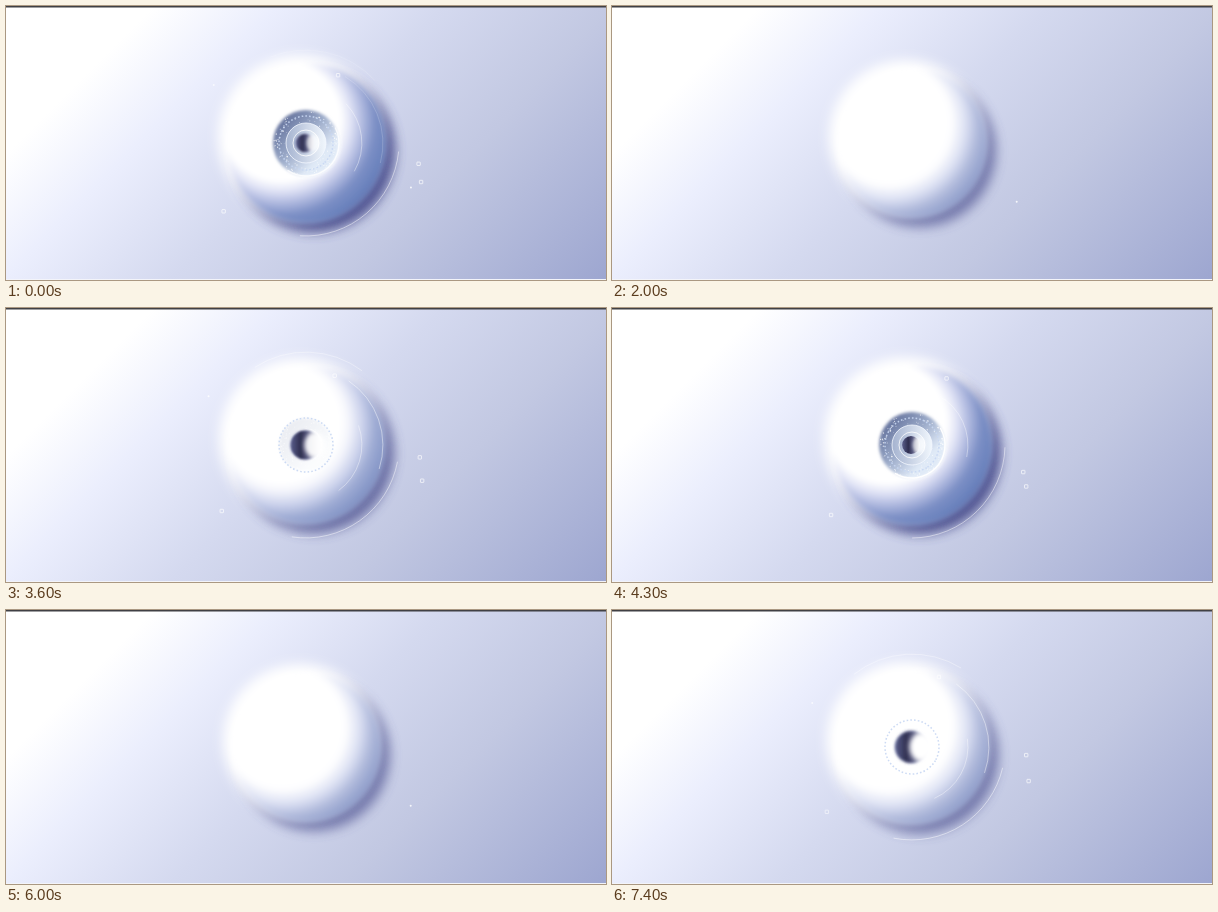
An HTML page that plays this animation: 600 px wide and 274 px high, repeating every 7.5 s.

```html
<!DOCTYPE html>
<html lang="en">
<head>
<meta charset="utf-8">
<title>Pulsing orb</title>
<style>
html, body { margin: 0; width: 100%; height: 100%; overflow: hidden; background: #fff; }
svg { display: block; width: 100vw; height: 100vh; }
</style>
</head>
<body>
<svg viewBox="0 0 600 274" preserveAspectRatio="none">
  <defs>
    <linearGradient id="sky" gradientUnits="userSpaceOnUse" x1="0" y1="0" x2="437" y2="437">
      <stop offset=".17" stop-color="#fff"/>
      <stop offset=".31" stop-color="#ebeefd"/>
      <stop offset=".5" stop-color="#d4d9ef"/>
      <stop offset=".7" stop-color="#c2c8e2"/>
      <stop offset="1" stop-color="#9da6d0"/>
    </linearGradient>
    <radialGradient id="soft" cx=".35" cy=".37" r=".74">
      <stop offset=".56" stop-color="#fff"/>
      <stop offset=".68" stop-color="#e1e5f5"/>
      <stop offset=".8" stop-color="#b4bddd"/>
      <stop offset="1" stop-color="#8090c2"/>
    </radialGradient>
    <radialGradient id="deep" cx=".34" cy=".36" r=".75">
      <stop offset=".5" stop-color="#fff"/>
      <stop offset=".59" stop-color="#dfe2f5"/>
      <stop offset=".69" stop-color="#adb7de"/>
      <stop offset=".79" stop-color="#7c8fc5"/>
      <stop offset=".9" stop-color="#6a82bd"/>
      <stop offset="1" stop-color="#5566a6"/>
    </radialGradient>
    <linearGradient id="irisFill" x1=".1" y1=".1" x2=".9" y2=".85">
      <stop offset="0" stop-color="#5d6b97"/>
      <stop offset=".45" stop-color="#9dacca"/>
      <stop offset=".8" stop-color="#e0eaf7"/>
    </linearGradient>
    <linearGradient id="innerFill">
      <stop offset="0" stop-color="#a5b3d0"/>
      <stop offset="1" stop-color="#f1f7fd"/>
    </linearGradient>
    <linearGradient id="pupilFill">
      <stop offset="0" stop-color="#5a5f8c"/>
      <stop offset=".35" stop-color="#2f2f50"/>
      <stop offset=".6" stop-color="#57597f"/>
      <stop offset="1" stop-color="#fff"/>
    </linearGradient>
    <filter id="blur1" x="-50%" y="-50%" width="200%" height="200%"><feGaussianBlur stdDeviation="1.4"/></filter>
    <filter id="blur2" x="-50%" y="-50%" width="200%" height="200%"><feGaussianBlur stdDeviation="2.4"/></filter>
    <filter id="blur6" x="-50%" y="-50%" width="200%" height="200%"><feGaussianBlur stdDeviation="6"/></filter>
  </defs>
  <rect width="600" height="274" fill="url(#sky)"/>
  <g transform="translate(300 137)">
    <circle id="shade" cx="8" cy="8" fill="#454a8a" filter="url(#blur6)"/>
    <circle id="glow" cx="-6" cy="-6" fill="#fff" filter="url(#blur6)"/>
    <g filter="url(#blur2)">
      <circle id="body" fill="url(#soft)"/>
      <circle id="bodyDeep" fill="url(#deep)"/>
    </g>
    <g id="iris">
      <circle r="35" fill="#fff" opacity=".75" filter="url(#blur1)"/>
      <circle r="33" fill="url(#irisFill)" filter="url(#blur1)"/>
      <g id="specks" fill="#fff"></g>
      <circle r="20" fill="url(#innerFill)" stroke="#f4f8ff" stroke-width=".8"/>
      <circle r="13" fill="url(#innerFill)" stroke="#fff" stroke-width=".8"/>
    </g>
    <g id="hole">
      <circle r="16" fill="#d3daf4" filter="url(#blur1)"/>
      <circle id="pupil" r="16" fill="url(#pupilFill)" filter="url(#blur1)"/>
      <ellipse id="bulge" rx="11.5" ry="14" fill="#fff" filter="url(#blur2)"/>
    </g>
    <circle id="dashes" r="27" fill="none" stroke="#c8d8f3" stroke-width="1.5" stroke-dasharray="1.6 2.1"/>
    <g id="lines" fill="none" stroke="#fff" stroke-linecap="round"></g>
    <g id="marks"></g>
  </g>
  <rect width="600" height="1.5" fill="#404044"/>
  <rect y="273" width="600" height="1" fill="#f3f4fa"/>
</svg>
<script>
const LOOP = 7500, PULSE = 4000, STEP = 100;
const OFFSET = 1600; // the loop begins this far into a pulse
const $ = id => document.getElementById(id);

function set(el, attrs) {
  for (const key in attrs) el.setAttribute(key, attrs[key]);
  return el;
}

function add(parent, tag, attrs) {
  const el = document.createElementNS("http://www.w3.org/2000/svg", tag);
  parent.appendChild(el);
  return set(el, attrs);
}

const clamp = x => Math.min(1, Math.max(0, x));
const mix = (a, b, u) => a + (b - a) * u;

function ease(t, from, to) {
  const u = clamp((t - from) / (to - from));
  return u * u * (3 - 2 * u);
}

// Opacity of something that fades in after `from` and is gone at `to`.
const life = (t, [from, to], fade = 250) => clamp(Math.min(t - from, to - t) / fade);

const polar = (r, deg) => [r * Math.cos(deg * Math.PI / 180), r * Math.sin(deg * Math.PI / 180)];
const arcPath = (r, from, span) => `M${polar(r, from)}A${r} ${r} 0 0 1 ${polar(r, from + span)}`;

// Everything in orbit turns steadily from one angle to the other while it lives.
function orbitAngle({ turn, span: [from, to] }, t) {
  return mix(turn[0], turn[1], clamp((t - from) / (to - from)));
}

const arcs = [
  { r: 93, sweep: 88, turn: [24, -6], span: [150, 2500], alpha: .6 },
  { r: 93, sweep: 70, turn: [-152, -110], span: [100, 1700], alpha: .45 },
  { r: 77, sweep: 74, turn: [-50, -60], span: [400, 1700], alpha: .55 },
  { r: 56, sweep: 74, turn: [25, -80], span: [450, 2200], alpha: .5 },
  { r: 33, sweep: 150, turn: [-25, -42], span: [1400, 3100], alpha: 1 }
];

const marks = [
  { r: 121.5, turn: [12.8, 22], span: [150, 2400] },
  { r: 114.5, turn: [-5, 19], span: [150, 2400] },
  { r: 75, turn: [-75, -59], span: [150, 2400] },
  { r: 107, turn: [143.5, 135], span: [800, 2950] },
  { r: 109, turn: [201, 215], span: [800, 1800], dot: true },
  { r: 114, turn: [22, 24], span: [1350, 1850], dot: true },
  { r: 120, turn: [28, 30.5], span: [3300, 3900], dot: true }
];

for (const arc of arcs) arc.el = add($("lines"), "path", { "stroke-width": arc.alpha < 1 ? .8 : 1.4 });
for (const mark of marks) {
  mark.el = mark.dot
    ? add($("marks"), "circle", { r: 1, fill: "#fff" })
    : add($("marks"), "rect", { x: -1.7, y: -1.7, width: 3.4, height: 3.4, rx: .4, fill: "none", stroke: "#fff", "stroke-width": .8 });
}

let seed = 7;
const random = () => (seed = seed * 16807 % 2147483647) / 2147483647;
for (let i = 0; i < 110; i++) {
  const [cx, cy] = polar(mix(21, 32, random()), 360 * random());
  add($("specks"), "circle", { cx, cy, r: mix(.3, .8, random()), opacity: mix(.3, .9, random()) });
}

function render(time) {
  const t = (time + OFFSET) % PULSE;
  const size = ease(t, 0, 1500) * (1 - ease(t, 3200, PULSE));
  const open = ease(t, 900, 1600) * (1 - ease(t, 2700, 3800));
  const narrow = ease(t, 1000, 1700) * (1 - ease(t, 1900, 2700));
  const r = mix(70, 80, size);

  set($("shade"), { r: r + 1, opacity: mix(.6, .92, open) });
  set($("glow"), { r: r + 2 });
  set($("body"), { r });
  set($("bodyDeep"), { r, opacity: open });

  set($("iris"), { opacity: life(t, [1150, 2700], 400), transform: `scale(${mix(.75, 1, ease(t, 1000, 1600))})` });
  set($("specks"), { transform: `rotate(${t * .02})` });
  set($("dashes"), { opacity: .9 * life(t, [750, 2600]), transform: `rotate(${t * .03})` });

  set($("hole"), { opacity: life(t, [0, 3300]), transform: `translate(-1 0) scale(${mix(1, .56, narrow)})` });
  set($("pupil"), { opacity: 1 - ease(t, 2000, 2750) });
  set($("bulge"), { cx: mix(10, 14, narrow), opacity: mix(1, .6, narrow) });

  for (const arc of arcs) {
    set(arc.el, { d: arcPath(arc.r, orbitAngle(arc, t), arc.sweep), opacity: arc.alpha * life(t, arc.span) });
  }
  for (const mark of marks) {
    set(mark.el, { transform: `translate(${polar(mark.r, orbitAngle(mark, t))})`, opacity: .85 * life(t, mark.span) });
  }
}

const start = performance.now();
function tick() {
  const time = (performance.now() - start) % LOOP;
  render(Math.floor(time / STEP) * STEP);
  requestAnimationFrame(tick);
}
tick();
</script>
</body>
</html>
```
